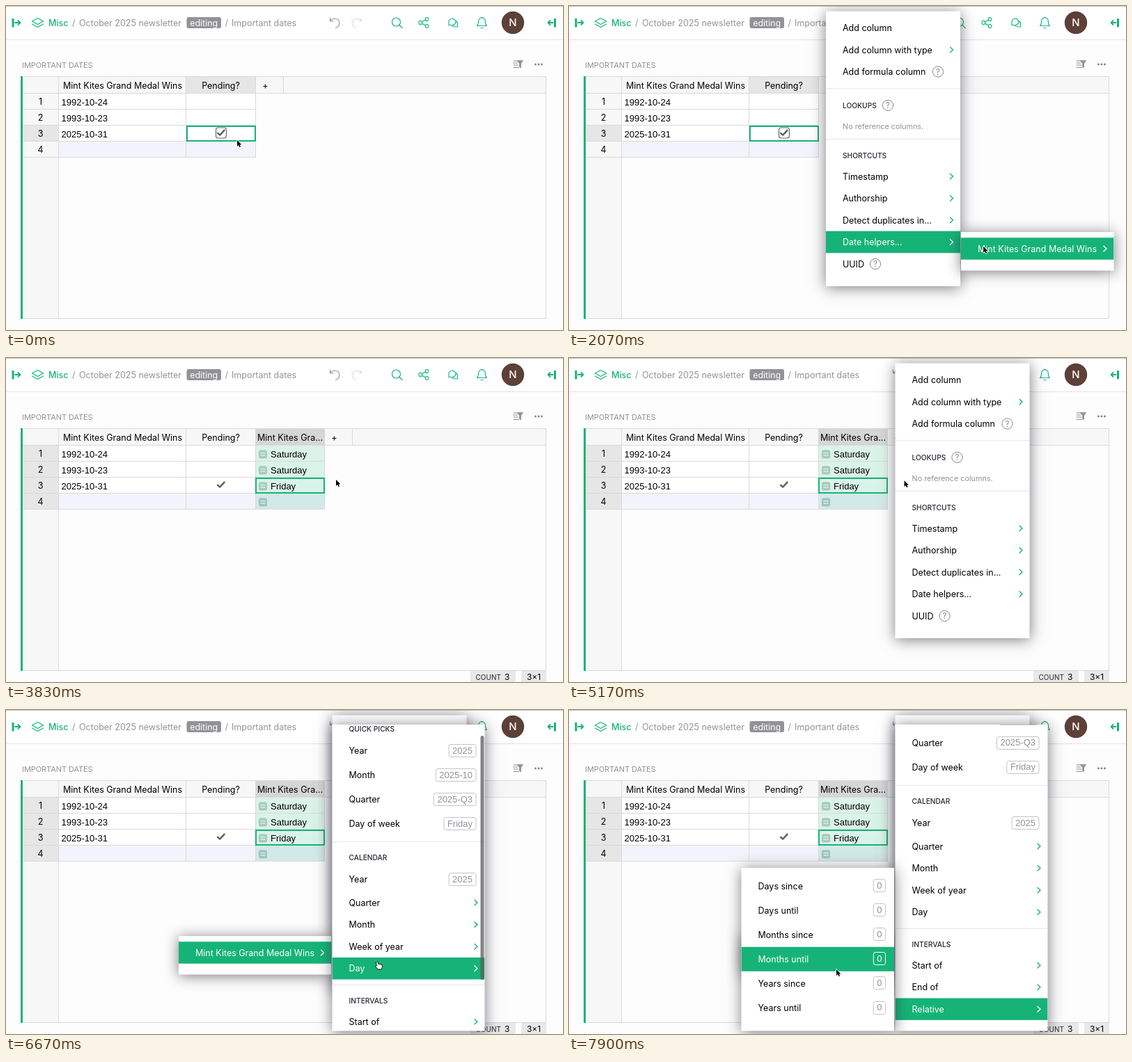
An HTML page with a canvas for the animation above (8 s loop, 800x466 px).

```html
<!DOCTYPE html>
<html lang="en">
<head>
<meta charset="utf-8">
<title>Date helpers</title>
<style>
html, body { margin: 0; width: 100%; height: 100%; overflow: hidden; background: #fff; }
canvas { display: block; width: 800px; height: 466px; }
</style>
</head>
<body>
<canvas id="stage"></canvas>
<script>
const W = 800, H = 466, LOOP = 8000;
const GREEN = '#16b378', LINE = '#d9d9d9', GRAY = '#929299', INK = '#000';
const UI = 'Inter, "Open Sans", sans-serif';
const CELL = '"Liberation Sans", Arial, sans-serif';
const TITLE = 'Mint Kites Grand Medal Wins';
const canvas = document.getElementById('stage');
const ctx = canvas.getContext('2d');
const dpr = window.devicePixelRatio || 1;
canvas.width = W * dpr;
canvas.height = H * dpr;

function rect(x, y, w, h, color) {
  ctx.fillStyle = color;
  ctx.fillRect(x, y, w, h);
}

function round(x, y, w, h, r, fill, stroke, lw = 1) {
  ctx.beginPath();
  ctx.roundRect(x, y, w, h, r);
  if (fill) { ctx.fillStyle = fill; ctx.fill(); }
  if (stroke) { ctx.strokeStyle = stroke; ctx.lineWidth = lw; ctx.stroke(); }
}

function disc(x, y, r, fill) {
  ctx.beginPath();
  ctx.arc(x, y, r, 0, 7);
  ctx.fillStyle = fill;
  ctx.fill();
}

// y is the middle of the capitals
function text(s, x, y, { size = 12.5, color = INK, weight = 400, font = UI, align = 'left' } = {}) {
  ctx.font = `${weight} ${size}px ${font}`;
  ctx.textAlign = align;
  ctx.fillStyle = color;
  ctx.fillText(s, x, y + size * 0.36);
}

function icon(d, x, y, color, lw = 1.2, fill = false) {
  const p = new Path2D(d);
  ctx.save();
  ctx.translate(x, y);
  ctx.lineCap = ctx.lineJoin = 'round';
  ctx.strokeStyle = ctx.fillStyle = color;
  ctx.lineWidth = lw;
  if (fill) ctx.fill(p);
  if (lw) ctx.stroke(p);
  ctx.restore();
}

// Smooth track through [time, ...values]; speed is zero next to a rest.
function track(keys, t) {
  const n = keys.length;
  if (t <= keys[0][0]) return keys[0].slice(1);
  if (t >= keys[n - 1][0]) return keys[n - 1].slice(1);
  let i = 0;
  while (t >= keys[i + 1][0]) i++;
  const same = (a, b) => a.slice(1).every((v, k) => v === b[k + 1]);
  const slope = (j, k) => {
    if (j === 0 || j === n - 1) return 0;
    const a = keys[j - 1], b = keys[j], c = keys[j + 1];
    if (same(a, b) || same(b, c)) return 0;
    return (c[k] - a[k]) / (c[0] - a[0]);
  };
  const a = keys[i], b = keys[i + 1], d = b[0] - a[0], u = (t - a[0]) / d;
  return a.slice(1).map((v, m) => {
    const k = m + 1, s = u * u * (3 - 2 * u);
    return v + (b[k] - v) * s + d * (u * (1 - u) ** 2 * slope(i, k) - u * u * (1 - u) * slope(i + 1, k));
  });
}

const POINTER = [
  [0, 332, 193], [70, 332, 193], [560, 372, 111], [1030, 372, 111], [1170, 436, 225],
  [1480, 450, 337], [1830, 450, 337], [2100, 600, 346], [2370, 600, 346], [2640, 449, 346],
  [2890, 449, 346], [3250, 455, 285], [3600, 474, 175], [4330, 474, 175], [4590, 471, 112],
  [5000, 471, 112], [5270, 490, 230], [5500, 505, 337], [5770, 505, 337], [6000, 452, 346],
  [6150, 452, 346], [6500, 532, 363], [6980, 532, 363], [7230, 515, 430], [7470, 515, 430],
  [7650, 440, 420], [7870, 384, 373]
];
const SCROLL = [[6620, 0], [6670, 12.7], [6960, 94]];

// Menu entries: kind, middle y, label, extra
const item = (y, label, o = {}) => ({ kind: 'item', y, label, h: o.badge ? 35 : 31.5, ...o });
const head = (y, label, help) => ({ kind: 'head', y, label, help });
const rule = y => ({ kind: 'rule', y });
const more = { more: true };

const MAIN = [
  item(31.5, 'Add column'), item(63, 'Add column with type', more),
  item(94.5, 'Add formula column', { help: 161 }),
  rule(118.5), head(143, 'LOOKUPS', 89), { kind: 'note', y: 173.5, label: 'No reference columns.' },
  rule(191.5), head(215, 'SHORTCUTS'),
  item(245, 'Timestamp', more), item(276.5, 'Authorship', more),
  item(308, 'Detect duplicates in...', more), item(339.5, 'Date helpers...', more),
  item(371, 'UUID', { help: 71 })
];
const COLUMN = [item(349, TITLE, more)];
const PICKS = [
  head(40, 'QUICK PICKS'),
  item(71.5, 'Year', { badge: '2025' }), item(106.5, 'Month', { badge: '2025-10' }),
  item(141.5, 'Quarter', { badge: '2025-Q3' }), item(176.5, 'Day of week', { badge: 'Friday' }),
  rule(202.5), head(225, 'CALENDAR'), item(256.7, 'Year', { badge: '2025' }),
  item(290, 'Quarter', more), item(321.6, 'Month', more),
  item(353.2, 'Week of year', more), item(384.7, 'Day', more),
  rule(408.5), head(431.5, 'INTERVALS'),
  item(461.2, 'Start of', more), item(492.7, 'End of', more), item(524.2, 'Relative', more)
];
const WEEK = [item(365, 'Default', { badge: 'Week 44' }), item(400, 'Sortable', { badge: '2025-W44' })];
const RELATIVE = ['Days', 'Months', 'Years'].flatMap((unit, i) =>
  ['since', 'until'].map((w, j) => item(253 + 35.1 * (2 * i + j), `${unit} ${w}`, { badge: '0' })));

const menu = (from, to, x, y, w, h, items, path) => ({ from, to, x, y, w, h, items, path });
const MENUS = [
  menu(640, 3730, 369, 7.5, 193, 395.5, MAIN, 'Date helpers...'),
  menu(1560, 3730, 563, 325, 219.5, 55.5, COLUMN, TITLE),
  menu(2180, 3730, 342.5, 21, 219.5, 440.5, PICKS, 'Week of year'),
  menu(2660, 3130, 563, 338.5, 220, 94.5, WEEK),
  menu(4850, LOOP, 468.5, 7.5, 193, 395.5, MAIN, 'Date helpers...'),
  menu(5560, LOOP, 248, 325, 219, 55.5, COLUMN, TITLE),
  menu(6120, LOOP, 468.5, 21, 219, 440.5, PICKS, 'Relative'),
  menu(7380, LOOP, 247.5, 227, 219.5, 234.5, RELATIVE)
];

function help(x, y, color) {
  ctx.beginPath();
  ctx.arc(x, y, 7.6, 0, 7);
  ctx.strokeStyle = color;
  ctx.lineWidth = 1;
  ctx.stroke();
  text('?', x, y, { size: 11.5, color, align: 'center' });
}

function drawItem(m, it, y, on) {
  const x = m.x + 24, right = m.x + m.w;
  if (on) rect(m.x, y - it.h / 2, m.w, it.h, GREEN);
  text(it.label, x, y, { color: on ? '#fff' : INK });
  if (it.help) help(m.x + it.help, y, on ? '#fff' : '#86868c');
  if (it.more) icon('M-2 -3.7L2 0L-2 3.7', right - 12.5, y, on ? '#fff' : GREEN, 1.4);
  if (it.badge) {
    ctx.font = `13px ${CELL}`;
    const w = ctx.measureText(it.badge).width + 10;
    round(right - 12.5 - w, Math.round(y) - 9.5, w, 18, 3, null, on ? '#fff' : '#c4c4c8');
    text(it.badge, right - 7.5 - w, y - 0.7, { size: 13, font: CELL, color: on ? '#fff' : '#929299' });
  }
}

function drawMenu(m, sel, shift, bar) {
  ctx.save();
  ctx.shadowColor = 'rgba(38,38,51,.6)';
  ctx.shadowBlur = 20 * dpr;
  ctx.shadowOffsetY = 2 * dpr;
  rect(m.x, m.y, m.w, m.h, '#fff');
  ctx.restore();
  ctx.save();
  ctx.beginPath();
  ctx.rect(m.x, m.y, m.w, m.h);
  ctx.clip();
  for (const it of m.items) {
    const y = it.y - shift;
    if (it.kind === 'item') drawItem(m, it, y, it === sel);
    else if (it.kind === 'rule') rect(m.x, Math.floor(y), m.w, 1, '#e8e8ea');
    else if (it.kind === 'note') text(it.label, m.x + 24, y, { size: 10.8, color: GRAY });
    else {
      text(it.label, m.x + 24, y, { size: 10.2, weight: 500, color: '#262633' });
      if (it.help) help(m.x + it.help, y, '#86868c');
    }
  }
  if (bar) round(m.x + m.w - 6, 25 + shift * 0.92, 5, 351, 2.5, 'rgba(90,90,90,.75)');
  ctx.restore();
}

function drawMenus(t, px, py) {
  const open = MENUS.filter(m => t >= m.from && t < m.to);
  const inside = m => px >= m.x && px < m.x + m.w && py >= m.y && py < m.y + m.h;
  const top = open.findLast(inside);
  open.forEach((m, i) => {
    const shift = m.items === PICKS && t > 6000 ? track(SCROLL, t)[0] : 0;
    let sel = null;
    if (m === top) sel = m.items.find(it => it.kind === 'item' && Math.abs(py - it.y + shift) <= it.h / 2);
    else if (i < open.length - 1) sel = m.items.find(it => it.label === m.path);
    const bar = m.items === PICKS && (t < 3300 || (t > 6000 && t < 7400));
    drawMenu(m, sel, shift, bar);
  });
}

function drawTopBar() {
  rect(0, 0, W, 49, '#fff');
  rect(0, 0, W, 1, '#c4c4c4');
  rect(0, 48, W, 1, '#e3e3e5');
  rect(8.5, 18, 3, 12.5, GREEN);
  icon('M13 24H20M17.5 21L20.5 24L17.5 27', 0, 0, GREEN, 1.8);
  rect(787, 18, 3, 12.5, GREEN);
  icon('M785.5 24H779M781.5 21L778.5 24L781.5 27', 0, 0, GREEN, 1.8);
  icon('M0 -6.5L8 -2L0 2.5L-8 -2ZM-8 2L0 6.5L8 2', 45.5, 24, GREEN, 1.2);
  text('Misc', 61, 24.5, { color: GREEN, weight: 500 });
  text('/', 95, 24.5, { color: GRAY });
  text('October 2025 newsletter', 105, 24.5, { color: GRAY });
  round(259.5, 16, 49.5, 16, 3, GRAY);
  text('editing', 284.2, 24.3, { color: '#fff', align: 'center' });
  text('/', 314.5, 24.5, { color: GRAY });
  text('Important dates', 324, 24.5, { color: GRAY });
  const undo = 'M-6.5 -7V-2.2H-1.8M-6.3 -2.4C-3 -7.5 6.5 -7 6.8 .5C6.8 4 4.5 6.5 1.5 7.5';
  icon(undo, 472, 24, '#929299', 1.1);
  ctx.save();
  ctx.translate(504, 24);
  ctx.scale(-1, 1);
  icon(undo, 0, 0, '#dcdce0', 1.1);
  ctx.restore();
  icon('M5.5 -1A6 6 0 1 1 -6.5 -1A6 6 0 1 1 5.5 -1M4 3.5L8 7.5', 561, 24, GREEN);
  icon('M-2.5 0A2.3 2.3 0 1 1 -7 0A2.3 2.3 0 1 1 -2.5 0M7 -5A2.3 2.3 0 1 1 2.4 -5A2.3 2.3 0 1 1 7 -5' +
    'M7 5A2.3 2.3 0 1 1 2.4 5A2.3 2.3 0 1 1 7 5M-2.7 -1.1L2.6 -4M-2.7 1.1L2.6 4', 600, 24, GREEN);
  icon('M-6 3.5V0A5 5 0 0 1 4 -1.5A5 4.7 0 0 1 -1 3.5ZM4.5 -2.3A4.4 4.4 0 0 1 6.5 2V6H2.5A5 4 0 0 1 -1.5 4', 642, 24, GREEN);
  icon('M-7 4.5C-4.5 2.5 -5 0 -4.8 -2.5A4.8 4.8 0 0 1 4.8 -2.5C5 0 4.5 2.5 7 4.5ZM0 -7.2V-8M-1.7 7.5H1.7', 683.5, 24, GREEN);
  disc(728, 24, 16.2, '#5d4037');
  text('N', 728, 24, { size: 15, weight: 500, color: '#fff', align: 'center' });
}

function drawSection() {
  text('IMPORTANT DATES', 23, 85.5, { size: 10.9, color: GRAY });
  icon('M-6.5 -5H-1M-6.5 -2H-1M-6.5 1H0M-6.5 4.5H1', 735.5, 84, '#929299', 1.1);
  icon('M-1 -5.5H7L4 -1V5L2 3.5V-1Z', 735.5, 84, '#929299', 0.8, true);
  for (const x of [760.5, 765, 769.5]) disc(x, 84, 1.4, '#808087');
}

const ROWS = ['1992-10-24', '1993-10-23', '2025-10-31'];
const DAYS = ['Saturday', 'Saturday', 'Friday'];
const rowY = r => 126 + 23 * r;

function drawGrid(added, filled) {
  const end = added ? 458 : 359;
  rect(24, 101, 752, 25, '#f7f7f7');
  rect(24, 126, 52, 323, '#f7f7f7');
  rect(76, 126, end - 76, 92, '#fff');
  rect(76, 195, end - 76, 23, '#f3f3fd');
  if (added) rect(359, 101, 99, 25, '#d6d6d6');
  else rect(259, 101, 100, 25, '#e6e6e6');
  if (filled) rect(24, rowY(0), 52, 92, '#e6e6e6');
  else rect(24, rowY(2), 52, 23, '#e6e6e6');
  if (added) {
    rect(359, 126, 99, 69, '#daf3e8');
    rect(359, 195, 99, 23, '#d2eae7');
  }
  for (let r = 1; r <= 4; r++) rect(24, rowY(r) - 1, end - 24, 1, LINE);
  for (const y of [101, 125, 449]) rect(24, y, 752, 1, LINE);
  for (const x of [258, 358, end - 1]) rect(x, 101, 1, 117, LINE);
  rect(75, 101, 1, 348, LINE);
  rect(end + 39, 101, 1, 25, LINE);
  rect(775, 101, 1, 348, LINE);
  rect(21, 101, 3, 349, GREEN);

  text(TITLE, 167.5, 114, { align: 'center' });
  text('Pending?', 308.5, 114, { align: 'center' });
  if (added) text('Mint Kites Gra...', 408, 114, { align: 'center' });
  text('+', end + 13.5, 114, { align: 'center' });
  for (let r = 0; r < 4; r++) text(String(r + 1), 49.5, rowY(r) + 11.2, { align: 'center' });
  ROWS.forEach((s, r) => text(s, 79.5, rowY(r) + 12, { size: 13, font: CELL }));

  if (!added) round(301.5, 175, 15, 15, 3, '#fff', '#6a6a6a', 1.2);
  icon('M-4.7 .6L-1.6 3.4L4.8 -3.6', 308.8, 182.2, '#606060', 2.4);

  if (added) {
    for (let r = 0; r < 4; r++) {
      const y = rowY(r) + 6.5;
      round(363, y, 12, 12, 2.5, r < 3 ? '#a5cbb9' : '#9fc4bb');
      rect(365.5, y + 3.5, 7, 1.3, '#e4f5ed');
      rect(365.5, y + 7, 7, 1.3, '#e4f5ed');
      if (filled && r < 3) text(DAYS[r], 380, rowY(r) + 12, { size: 13, font: CELL });
    }
  }
  ctx.strokeStyle = GREEN;
  ctx.lineWidth = 2;
  ctx.strokeRect(end - 99, 173, 98, 21);

  if (filled) {
    rect(667, 450, 65, 16, '#e8e8e8');
    rect(740, 450, 36, 16, '#e8e8e8');
    text('COUNT', 674.5, 459.3, { size: 10, color: '#262633' });
    text('3', 716, 458.8, { size: 12 });
    text('3×1', 758, 458.8, { size: 12, align: 'center' });
  }
}

function drawPointer(x, y, hand) {
  const d = hand
    ? 'M0 0C1 -.8 1.8 -.3 2 .7L2.5 3C4 2.3 4.8 2.8 5 3.3C6 2.8 6.8 3.3 7 4C8 3.8 8.3 4.6 8.2 5.5L7.2 9.5H2.4L-.7 6C-1.2 5 .2 4.6 1 5.6Z'
    : 'M0 0V9L2.1 7.1L3.5 10.2L5 9.5L3.7 6.5H6.4Z';
  if (hand) {
    icon(d, x, y, '#111', 1.8);
    icon(d, x, y, '#fff', 0, true);
  } else {
    icon(d, x, y, '#fff', 1.6);
    icon(d, x, y, '#000', 0, true);
  }
}

function draw(t) {
  ctx.setTransform(dpr, 0, 0, dpr, 0, 0);
  rect(0, 0, W, H, '#fdfdfd');
  drawTopBar();
  drawSection();
  drawGrid(t >= 3770, t >= 3820);
  const [x, y] = track(POINTER, t);
  drawMenus(t, x, y);
  drawPointer(x, y, t > 6300 && t < 7050);
}

const start = performance.now();
function frame(now) {
  draw(Math.max(0, now - start) % LOOP);
  requestAnimationFrame(frame);
}
draw(0);
requestAnimationFrame(frame);
</script>
</body>
</html>
```
